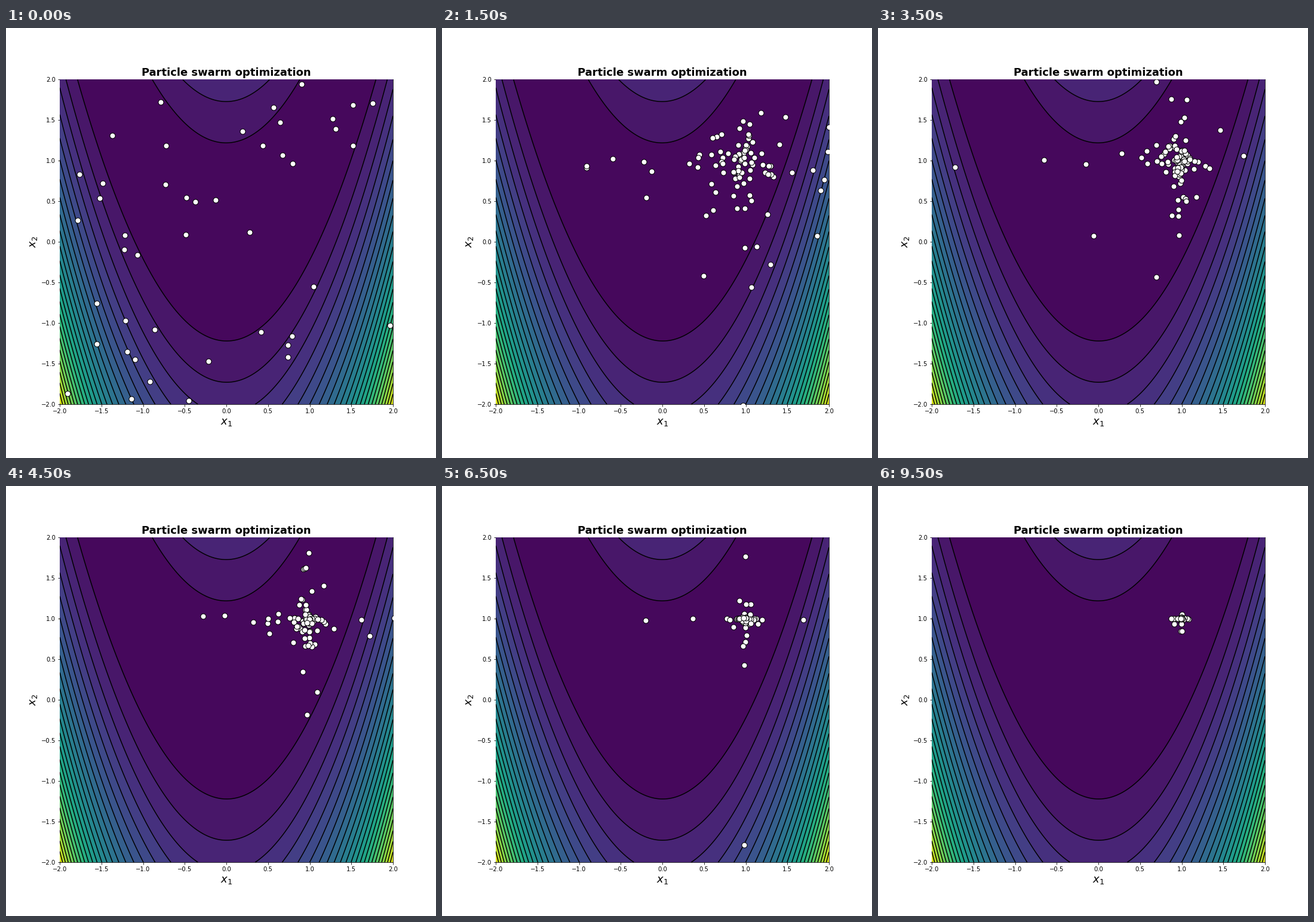
A matplotlib script that plays this animation: 720 by 720 pixels, repeating every 10000 ms.

```python
import numpy as np
import matplotlib.pyplot as plt
from matplotlib.animation import FuncAnimation

plt.rcParams["font.family"] = "DejaVu Sans"

STEPS, INTERVAL = 20, 500
SWARM, START_RANGE = 100, 3.3
OPTIMUM = 1.0


def rosenbrock(x, y):
    return (1 - x) ** 2 + 100 * (y - x ** 2) ** 2


def swarm_at(step):
    """Uniform start, then a heavy-tailed cloud contracting onto the optimum."""
    rng = np.random.default_rng(40 + step)
    shape = (2, SWARM)
    if step == 0:
        return rng.uniform(-START_RANGE, START_RANGE, shape)
    scale = 0.9 * np.exp(-0.3 * step)
    tail = 0.75 + 0.065 * step
    reach = scale * np.exp(tail * rng.normal(size=shape))
    return OPTIMUM + reach * rng.normal(-0.3, 1, shape)


fig, ax = plt.subplots(figsize=(10, 10), dpi=72)
fig.subplots_adjust(left=0.125, right=0.9, bottom=0.125, top=0.88)

axis = np.linspace(-2, 2, 201)
X, Y = np.meshgrid(axis, axis)
Z = rosenbrock(X, Y)
levels = np.arange(0, 3751, 150)
ax.contourf(X, Y, Z, levels, cmap="viridis")
ax.contour(X, Y, Z, levels[1:], colors="black", linewidths=1.5)

# The contours cover the inner edge of the frame
for spine in ax.spines.values():
    spine.set_zorder(0.5)

ax.set_xlim(-2, 2)
ax.set_ylim(-2, 2)
ax.set_title("Particle swarm optimization", fontsize=18, fontweight="bold")
ax.set_xlabel("$x_1$", fontsize=18)
ax.set_ylabel("$x_2$", fontsize=18)

dots, = ax.plot([], [], "o", ms=9, mfc="white", mec="black", mew=1, zorder=3)


def update(step):
    dots.set_data(*swarm_at(step))
    return dots,


anim = FuncAnimation(fig, update, frames=STEPS, interval=INTERVAL,
                     repeat=True, repeat_delay=0)
plt.show()
```
